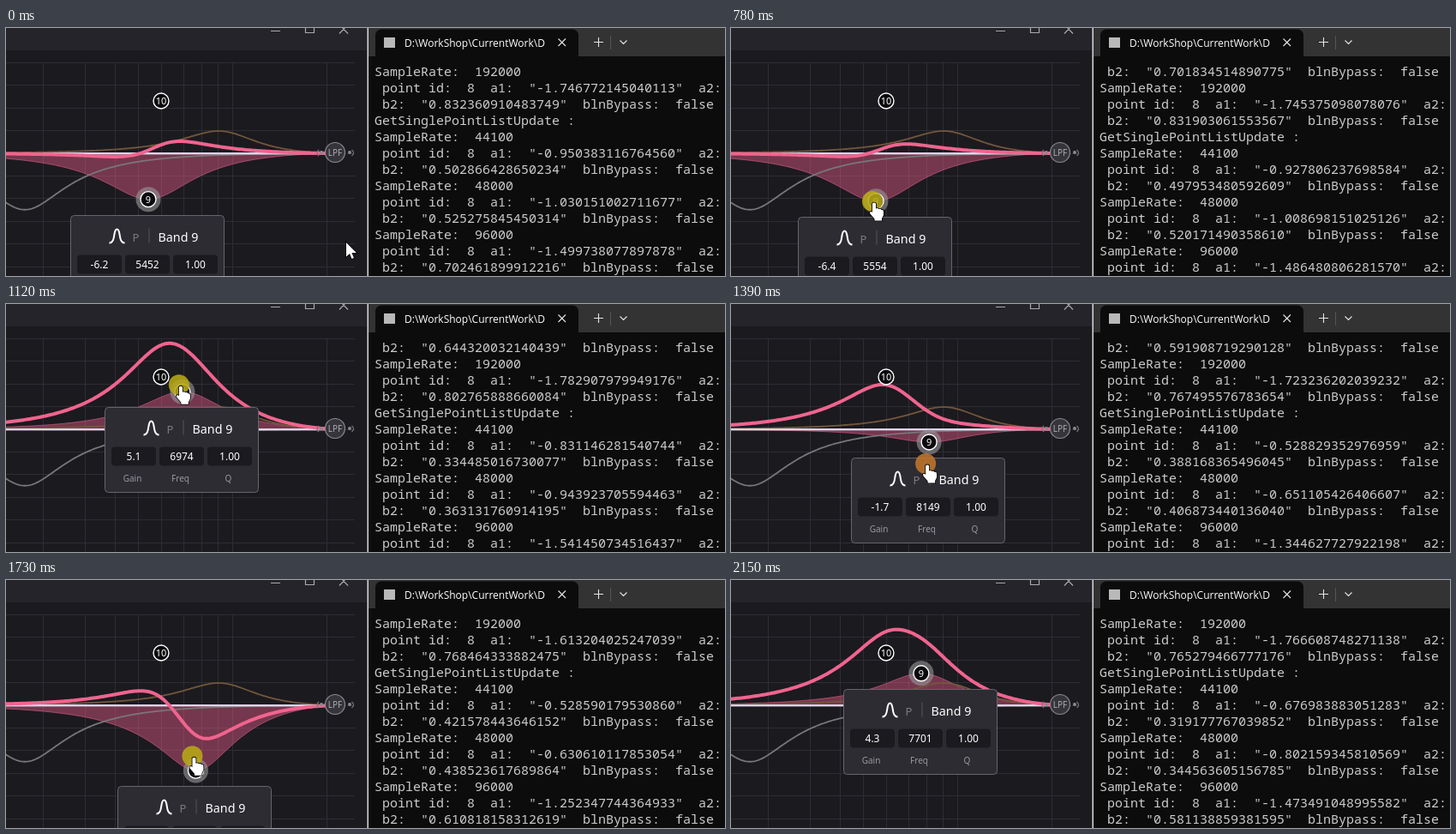
Animation, 839 px wide and 289 px high, one loop 2680 ms. Source, as an HTML page with a canvas:

```html
<!DOCTYPE html>
<html>
<head>
<meta charset="utf-8">
<style>
html, body { margin: 0; width: 100%; height: 100%; overflow: hidden; background: #0c0c0c; }
canvas { display: block; }
</style>
</head>
<body>
<canvas id="stage" width="839" height="289"></canvas>
<script>
const ctx = document.getElementById('stage').getContext('2d');
const LOOP = 2680, STEP = 70, DRAG = 650, END = 2150;
const ZERO = 146, PX_PER_DB = 8.65, NYQUIST = 22050;
const SANS = '"Noto Sans", "Open Sans", sans-serif';
const MONO = '"Noto Sans Mono", "DejaVu Sans Mono", monospace';

// Turning points: time, value(s)
const freqPath = [[618, 5452], [1440, 8174], [1590, 7701], [1870, 7653], [END, 7701]];
const gainPath = [[580, -6.2], [780, -6.5], [1120, 6], [1630, -8.15], [1730, -8.8], [2010, 4.6], [END, 4.3]];
const arrowPath = [[70, 397, 250], [370, 40, 179], [510, 142, 183], [580, 164, 196]];

// Cosine easing from one turning point to the next
function ease(path, t) {
  const i = path.findIndex(p => p[0] >= t);
  if (i < 1) return path.at(i).slice(1);
  const a = path[i - 1], b = path[i];
  const k = (1 - Math.cos(Math.PI * (t - a[0]) / (b[0] - a[0]))) / 2;
  return b.slice(1).map((v, j) => a[j + 1] + (v - a[j + 1]) * k);
}
const band = t => ({ freq: ease(freqPath, t)[0], gain: ease(gainPath, t)[0] });

// The picture moves in hard steps that restart at a few moments.
function quantize(t) {
  const base = [0, 440, 920, 1180, 1590].findLast(s => s <= t);
  return Math.min(t - (t - base) % STEP, END);
}

const freqToX = f => 166 + 162 * Math.log(f / 5452);
const xToFreq = x => 5452 * Math.exp((x - 166) / 162);
const gainToY = g => ZERO - g * PX_PER_DB;
const warp = f => Math.tan(Math.PI / 2 * f / NYQUIST);

// Response in dB of a peaking filter
function bell(x, freq, gain, q = 1.12) {
  const r = warp(xToFreq(x)) / warp(freq), u = ((r - 1 / r) * q) ** 2, a = 10 ** (gain / 20);
  return 10 * Math.log10((u + a) / (u + 1 / a));
}

// Coefficients of the same filter, with Q = 1
function biquad({ freq, gain }, rate) {
  const w = 2 * Math.PI * freq / rate, a = 10 ** (gain / 40), alpha = Math.sin(w) / 2;
  const norm = 1 + alpha / a;
  return { a1: -2 * Math.cos(w) / norm, b2: (1 - alpha * a) / norm };
}

function text(str, x, y, font, color, align = 'left') {
  ctx.font = font;
  ctx.fillStyle = color;
  ctx.textAlign = align;
  ctx.fillText(str, x, y);
}
function rect(x, y, w, h, color) {
  ctx.fillStyle = color;
  ctx.fillRect(x, y, w, h);
}
function box(x, y, w, h, r, fill, stroke) {
  ctx.beginPath();
  ctx.roundRect(x, y, w, h, r);
  paint(fill, stroke);
}
function circle(x, y, r, fill, stroke, width) {
  ctx.beginPath();
  ctx.arc(x, y, r, 0, 7);
  paint(fill, stroke, width);
}
function paint(fill, stroke, width = 1) {
  if (fill) { ctx.fillStyle = fill; ctx.fill(); }
  if (stroke) { ctx.strokeStyle = stroke; ctx.lineWidth = width; ctx.stroke(); }
}
function line(d, color, width = 1) {
  ctx.strokeStyle = color;
  ctx.lineWidth = width;
  ctx.stroke(new Path2D(d));
}
function curve(gainAt, color, width, fill) {
  ctx.beginPath();
  for (let x = -2; x <= 380; x += 2) ctx.lineTo(x, gainToY(gainAt(x)));
  paint(null, color, width);
  if (!fill) return;
  ctx.lineTo(380, ZERO);
  ctx.lineTo(-2, ZERO);
  paint(fill);
}

function drawGraph({ freq, gain }) {
  rect(0, 0, 422, 289, '#1b1a1f');
  rect(0, 0, 422, 26, '#25242a');
  line('M309 3.5H320M349.5 -5V5.5H359.5V-5M389 -4L399 6.5M399 -4L389 6.5', '#a9a9ad', 1.2);
  for (let y = 40; y < 289; y += 26.4) rect(0, Math.round(y), 407, 1, '#2e2d33');
  for (const x of [43, 92, 127, 154, 181, 207, 228, 247, 264, 374]) rect(x, 40, 1, 249, '#2e2d33');

  ctx.save();
  ctx.beginPath();
  ctx.rect(0, 40, 408, 249);
  ctx.clip();
  const band9 = x => bell(x, freq, gain);
  curve(band9, '#8d4660', 1, 'rgba(226,92,134,0.45)');
  curve(x => bell(x, 2242, -7.6, 1.3), '#77767a', 1.8);
  curve(x => bell(x, 9050, 3), '#72573a', 1.8);
  rect(0, 145, 380, 2.4, '#dcd3e6');
  curve(x => band9(x) + bell(x, 5981, 7), '#f0648f', 4);
  ctx.restore();

  line('M365 142Q361 145.5 365 149M403.5 142Q407.5 145.5 403.5 149', '#77767c', 1.2);
  circle(368, 145, 2, '#8a898e');
  circle(401, 145, 2, '#8a898e');
  circle(384, 145, 11.5, '#36353b', '#8a898e', 1.2);
  text('LPF', 384, 149, '10px ' + SANS, '#aaa9ae', 'center');
}

function drawDot(x, y, label) {
  circle(x, y, 9, '#0b0b0d', '#fff', 1.4);
  text(label, x, y + 4, '11px ' + SANS, '#fff', 'center');
}

function drawPanel(x, y, { freq, gain }) {
  ctx.save();
  ctx.translate(Math.round(x) - 90.5, Math.round(y) + 18.5);
  box(0, 0, 179, 99, 4, '#2d2c33', '#66656b');
  line('M45 32C53 32 49 16 54 16C59 16 55 32 63 32', '#fff', 2);
  text('P', 72, 30, '13px ' + SANS, '#7d7c82');
  line('M91.5 15V32', '#55545a');
  text('Band 9', 102, 30, '14.3px ' + SANS, '#fff');
  [gain.toFixed(1), Math.round(freq), '1.00'].forEach((value, i) => {
    const left = 7.5 + i * 56;
    box(left, 46, 52, 22, 4, '#1b1a1f');
    text(value, left + 26, 61.5, '12px ' + SANS, '#fff', 'center');
    text(['Gain', 'Freq', 'Q'][i], left + 24.5, 86, '10px ' + SANS, '#99989e', 'center');
  });
  ctx.restore();
}

const arrow = new Path2D('M0 0V16.5L4 13L6.5 19L9 18L6.5 12H12Z');
const hand = new Path2D('M0 1.5Q2 -.5 4 1.5V7.5Q6 6.5 7.5 8Q9.5 7.2 10.5 9Q13 8.5 13 11V15L11 19V21.5H2.5V19.5L-3 13Q-3.5 10.5 -1 11L0 12Z');
function drawCursor(shape, x, y) {
  ctx.save();
  ctx.translate(x, y);
  ctx.lineWidth = 1.6;
  ctx.strokeStyle = '#000';
  ctx.stroke(shape);
  ctx.fillStyle = '#fff';
  ctx.fill(shape);
  ctx.restore();
}

function drawTitleBar() {
  rect(423, 0, 416, 33, '#333333');
  box(431, 1.5, 237, 40, 7, '#0c0c0c');
  rect(423, 33, 416, 256, '#0c0c0c');
  rect(441, 11, 13, 12, '#b9b9b9');
  text('D:\\WorkShop\\CurrentWork\\D', 465, 22, '500 12px "Open Sans", "Noto Sans", sans-serif', '#fff');
  line('M644.5 12.5L653 21M653 12.5L644.5 21M686 16.5H697M691.5 11V22M716.5 14.5L720.5 18.5L724.5 14.5', '#e4e4e4', 1.1);
  line('M705.5 9V25', '#555');
}

function drawTerminal(t) {
  rect(422, 0, 417, 289, '#0c0c0c');
  drawTitleBar();
  // Rows above the update heading belong to the step before.
  const now = band(t), before = band(t - STEP);
  const b2Row = (state, rate) => ` b2:  "${biquad(state, rate).b2.toFixed(15)}"  blnBypass:  false`;
  const block = (state, rate) => [
    'SampleRate:  ' + rate,
    ` point id:  8  a1:  "${biquad(state, rate).a1.toFixed(15)}"  a2:`,
    b2Row(state, rate)
  ];
  const rows = [
    ...block(before, 192000),
    'GetSinglePointListUpdate :',
    ...[44100, 48000, 96000].flatMap(rate => block(now, rate))
  ];
  // During the first long drag the list sits one row lower.
  if (t >= DRAG && t < 1730) rows.unshift(b2Row(before, 96000));
  rows.slice(0, 13).forEach((row, i) => text(row, 430, 55.5 + i * 19.05, '500 15px ' + MONO, '#cccccc'));
  rect(421.5, 0, 1.5, 289, '#d8d8d8');
}

function draw(t) {
  const state = band(t), x = freqToX(state.freq), y = gainToY(state.gain);
  drawGraph(state);
  drawDot(181, 85, '10');
  circle(x, y, 14.5, 'rgba(150,148,150,0.62)');
  drawDot(x, y, '9');
  drawPanel(x, y, state);
  drawTerminal(t);
  if (t < DRAG) {
    drawCursor(arrow, ...ease(arrowPath, t));
  } else if (t < END) {
    // The pointer's height runs one step ahead of the band.
    const cx = x - 4, cy = gainToY(band(t + STEP).gain);
    const pressed = t >= 1390 && t < 1460;
    circle(cx, cy, 12, pressed ? 'rgba(196,120,44,0.85)' : 'rgba(184,168,22,0.88)');
    drawCursor(hand, cx, cy + 1);
  }
}

const start = performance.now();
function tick() {
  draw(quantize((performance.now() - start) % LOOP));
  requestAnimationFrame(tick);
}
tick();
</script>
</body>
</html>
```
